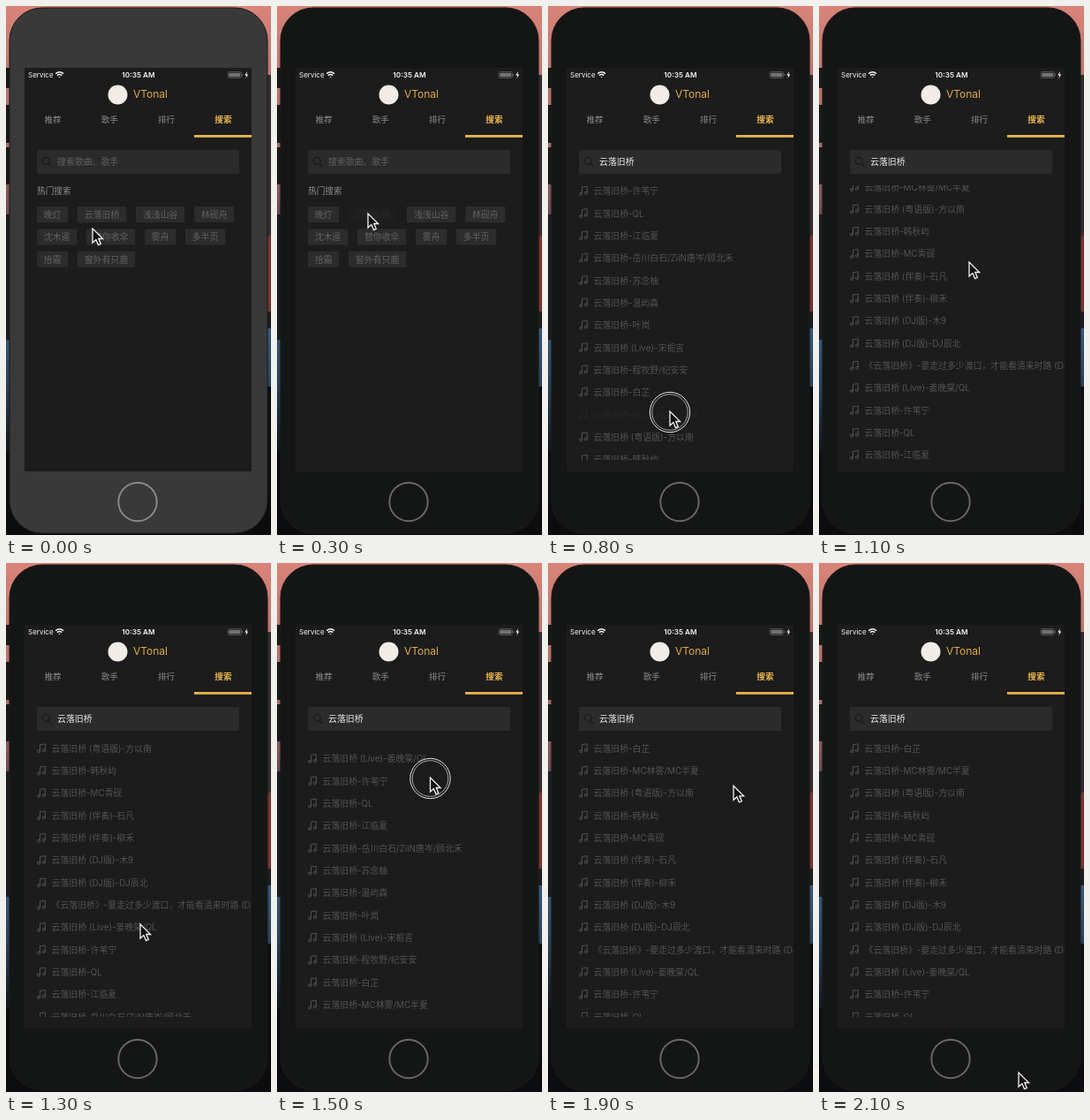
Write an HTML page that moves like this. It is 300 px wide and 599 px high and loops after 2200 ms.

```html
<!DOCTYPE html>
<html lang="zh-CN">
<head>
<meta charset="utf-8">
<title>Music search</title>
<style>
html, body { margin: 0; width: 100%; height: 100%; overflow: hidden; background: #0c0d0e; }
svg { display: block; width: 300px; height: 599px; }
text { font: 9.9px Inter, "Noto Sans CJK SC", "Noto Sans CJK", sans-serif; white-space: pre; }
.status { font-size: 8.2px; fill: #f4f4f4; }
.brand { font-size: 12px; fill: #e0aa48; }
.tab { font-size: 9.6px; fill: #8c8c8c; text-anchor: middle; }
.tab.on { font-weight: 700; fill: #efb950; }
.tag { text-anchor: middle; fill: #626262; }
.pressed { opacity: .16; }
.song { fill: #535353; }
</style>
</head>
<body>
<svg viewBox="0 0 300 599">
  <defs>
    <linearGradient id="sky" x2="0" y2="1">
      <stop offset="0" stop-color="#d98479"/>
      <stop offset=".3" stop-color="#c0776f"/>
      <stop offset=".75" stop-color="#a4675f"/>
      <stop offset="1" stop-color="#6a4a52"/>
    </linearGradient>
    <linearGradient id="water" x2="0" y2="1">
      <stop offset="0" stop-color="#38597a"/>
      <stop offset=".45" stop-color="#2c4259"/>
      <stop offset="1" stop-color="#121519"/>
    </linearGradient>
    <clipPath id="list"><rect x="21" y="203" width="257" height="311"/></clipPath>
    <path id="note" d="M3.5 3.2V-4.4L9.3 -5.2V2.2M3.5 3.2a1.5 1.4 0 1 1-3 0a1.5 1.4 0 1 1 3 0M9.3 2.2a1.5 1.4 0 1 1-3 0a1.5 1.4 0 1 1 3 0"
      fill="none" stroke="#585858" stroke-width=".9"/>
  </defs>

  <g id="wall">
    <rect width="300" height="599" fill="#0c0d0e"/>
    <rect width="300" height="236" fill="url(#sky)"/>
    <path d="M290 78h10v187h-10z" fill="#332c30"/>
    <path d="M290 264l10 -5v92h-10z" fill="#763530"/>
    <path d="M0 236h10v142H0zM290 346h10v20h-10z" fill="#1d1c20"/>
    <path d="M0 378h10v127H0zM290 365h10v66h-10z" fill="url(#water)"/>
    <path d="M0 70h6v23H0zM0 112h6v43H0zM0 160h6v42H0z" fill="#191818"/>
  </g>

  <rect id="body" x="4" y="2" width="292" height="595" rx="37" stroke="#1b1a1a"/>
  <circle id="home" cx="149" cy="561.5" r="21.7" fill="none" stroke-width="1.9"/>
  <rect x="21" y="70" width="257" height="457" fill="#1c1c1c"/>

  <text class="status" x="25" y="81" style="font-size:8px">Service</text>
  <g fill="none" stroke="#f4f4f4" stroke-width="1.4">
    <path d="M56.2 76.6q4.4-3.7 8.8 0M57.9 78.6q2.7-2.3 5.4 0"/>
    <path d="M59.5 80.1h2.2l-1.1 1.2z" fill="#f4f4f4" stroke="none"/>
  </g>
  <text class="status" x="150" y="81" text-anchor="middle" style="font-weight:600">10:35 AM</text>
  <rect x="251" y="74.5" width="15.5" height="7" rx="1.8" fill="#1c1c1c" stroke="#5c5c5c" stroke-width=".8"/>
  <rect x="252.2" y="75.7" width="13.1" height="4.6" rx=".8" fill="#727272"/>
  <path d="M267.6 76.8v2.4" stroke="#5c5c5c"/>
  <path d="M273 74l-2.7 4.5h1.8l-.7 3.5 2.8-4.6h-1.9z" fill="#f4f4f4"/>

  <circle cx="126.5" cy="100.5" r="11" fill="#f1ece6"/>
  <text class="brand" x="144" y="104.4">VTonal</text>
  <g id="tabs"></g>
  <rect x="213" y="146" width="65" height="2.8" fill="#e9b44c"/>

  <rect x="35" y="163" width="229" height="27" rx="1.5" fill="#2b2b2b"/>
  <path d="M49.2 175.4a4 4 0 1 1-8 0a4 4 0 1 1 8 0M48.2 178.6l3.2 3.2" fill="none" stroke="#161616" stroke-width="1.1"/>
  <text id="query" x="58" y="180"></text>

  <g id="hot"><text x="35" y="213" fill="#8c8c8c" style="font-size:9.7px">热门搜索</text></g>
  <g id="results" clip-path="url(#list)"><g id="songs"></g></g>

  <g id="touch" fill="none" stroke="#e2e2e2">
    <circle r="22.7" stroke-width="1"/>
    <circle r="20.3" stroke-width=".9" stroke="#b4b4b4"/>
  </g>
  <path id="cursor" d="M0 0V16L3.9 12.6L6.5 18.6L9.3 17.4L6.8 11.5H11.6Z" fill="#111" stroke="#f4f4f4" stroke-width="1.3"/>
</svg>
<script>
const LOOP = 2200, STEP = 100, ROW = 25.33, PAGE = 20;
const TITLE = "云落旧桥";
const $ = id => document.getElementById(id);

function add(parent, tag, attrs, text) {
  const el = document.createElementNS("http://www.w3.org/2000/svg", tag);
  for (const k in attrs) el.setAttribute(k, attrs[k]);
  if (text) el.textContent = text;
  parent.append(el);
  return el;
}

["推荐", "歌手", "排行", "搜索"].forEach((name, i) =>
  add($("tabs"), "text", { class: i == 3 ? "tab on" : "tab", x: 53 + i * 64.3, y: 132.3 }, name));

// Hot tags flow left to right; width follows the character count.
let hit;
[["晚灯", TITLE, "浅浅山谷", "林砚舟"],
 ["沈木遥", "替你收伞", "雾舟", "多半页"],
 ["拾霜", "窗外有只鹿"]].forEach((row, r) => {
  let x = 35;
  for (const word of row) {
    const w = 15 + word.length * 10.1, y = 227 + r * 25.4;
    const g = add($("hot"), "g", {});
    add(g, "rect", { x, y, width: w, height: 18, rx: 1, fill: "#2c2c2c" });
    add(g, "text", { class: "tag", x: x + w / 2, y: y + 12.8 }, word);
    if (word == TITLE) hit = g;
    x += w + 10.7;
  }
});

const versions = [
  "-许苇宁", "-QL", "-江临夏", "-岳川白石/ZiiN唐岑/顾北禾", "-苏念柚", "-温屿森", "-叶岚",
  " (Live)-宋栀言", "-程牧野/纪安安", "-白芷", "-MC林雾/MC半夏", " (粤语版)-方以南",
  "-韩秋屿", "-MC青砚", " (伴奏)-石凡", " (伴奏)-柳禾", " (DJ版)-木9", " (DJ版)-DJ辰北",
  "", " (Live)-姜晚棠/QL"
];
const long = `《${TITLE}》-要走过多少渡口，才能看清来时路 (DJ版)`;

const rows = Array.from({ length: 46 }, (_, i) => {
  const g = add($("songs"), "g", { transform: `translate(0 ${209.5 + i * ROW})` });
  const icon = add(g, "use", { href: "#note", x: 35, y: 0 });
  const v = versions[i % PAGE];
  add(g, "text", { class: "song", x: 51.5, y: 3.7 }, v ? TITLE + v : long);
  return { g, icon };
});
rows.forEach(({ g }) => g.querySelector("text").setAttribute("clip-path", "none"));

// Tables of [time, values...]
const pointer = [
  [0, 98, 252], [200, 102, 238], [300, 103, 235], [500, 105, 238], [700, 138, 459], [800, 138, 459],
  [1000, 168, 296], [1100, 170, 290], [1300, 152, 409], [1400, 153, 410],
  [1600, 194, 76], [1700, 198, 58], [1800, 202, 90], [2100, 226, 577]
];
const scroll = [
  [0, 0], [800, 0], [1000, 175], [1100, 258], [1200, 273], [1300, 278],
  [1400, 278], [1600, 660], [1700, 728], [1800, 734]
];

function at(keys, t) {
  const n = keys.findIndex(k => k[0] > t);
  if (n < 0) return keys[keys.length - 1].slice(1);
  const a = keys[n - 1], b = keys[n], p = (t - a[0]) / (b[0] - a[0]);
  return a.slice(1).map((v, i) => v + (b[i + 1] - v) * p);
}

const within = (t, from, to) => t >= from && t < to;
const show = (el, on) => el.setAttribute("visibility", on ? "visible" : "hidden");

function draw(t) {
  const found = t >= 500;
  const [x, y] = at(pointer, t);
  const [top] = at(scroll, t);

  $("body").setAttribute("fill", t < 100 ? "#393939" : "#141615");
  $("home").setAttribute("stroke", t < 100 ? "#8a8a8a" : "#686868");

  show($("hot"), !found);
  show($("results"), found);
  hit.classList.toggle("pressed", within(t, 300, 500));
  $("query").textContent = found ? TITLE : "搜索歌曲、歌手";
  $("query").setAttribute("fill", found ? "#ececec" : "#626262");
  $("query").style.fontWeight = found ? 500 : 400;

  $("songs").setAttribute("transform", `translate(0 ${-top})`);
  rows[10].g.classList.toggle("pressed", within(t, 700, 900));
  rows.forEach((row, i) => row.icon.setAttribute("opacity", i >= 2 * PAGE && t < 1800 ? 0 : 1));

  $("cursor").setAttribute("transform", `translate(${x} ${y})`);
  $("touch").setAttribute("transform", `translate(${x} ${y + 1})`);
  show($("touch"), within(t, 700, 1000) || within(t, 1400, 1600));
}

const start = performance.now();
function tick() {
  const t = (performance.now() - start) % LOOP;
  draw(Math.floor(t / STEP) * STEP);
  requestAnimationFrame(tick);
}
tick();
</script>
</body>
</html>
```
